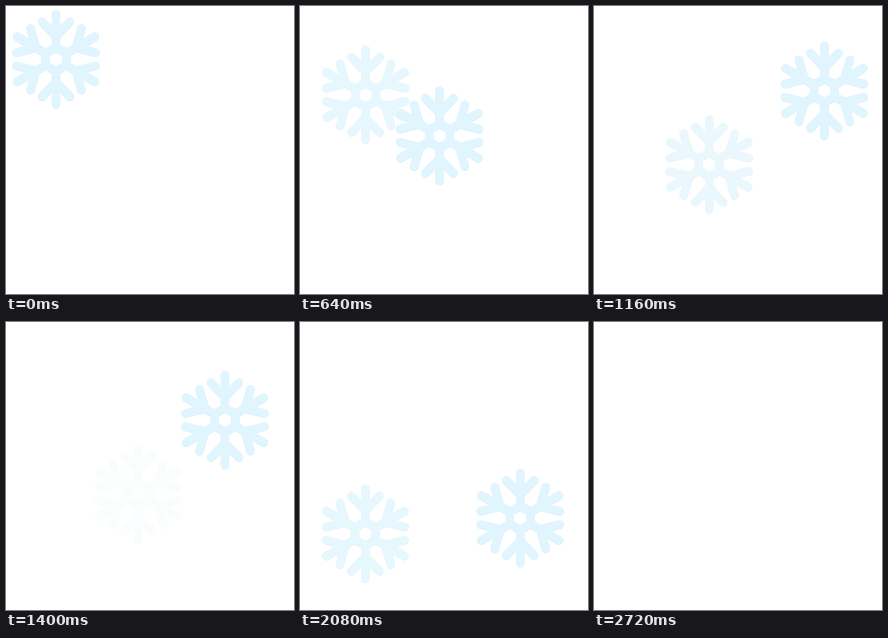
An HTML page for the animation above (2880 ms loop, 288 px wide and 288 px high).

```html
<!DOCTYPE html>
<html lang="en">
<head>
<meta charset="utf-8">
<title>Snowflakes</title>
<style>
  html, body { margin: 0; width: 100%; height: 100%; overflow: hidden; background: #fff; }
  svg { display: block; width: 100%; height: 100%; }
</style>
</head>
<body>
<svg id="stage" viewBox="0 0 288 288">
  <defs>
    <path id="arm" d="M0 -12V-45M-14 -37.5L0 -23L14 -37.5"/>
    <g id="shape" fill="none" stroke-width="8.4" stroke-linecap="round" stroke-linejoin="round">
      <path d="M0 -12L10.4 -6V6L0 12L-10.4 6V-6Z" stroke-linejoin="miter"/>
      <use href="#arm"/>
      <use href="#arm" transform="rotate(60)"/>
      <use href="#arm" transform="rotate(120)"/>
      <use href="#arm" transform="rotate(180)"/>
      <use href="#arm" transform="rotate(240)"/>
      <use href="#arm" transform="rotate(300)"/>
    </g>
    <g id="flake">
      <use href="#shape" y="0.5" stroke="#d3edf7"/>
      <use href="#shape" stroke="#e1f5fe"/>
    </g>
  </defs>
</svg>
<script>
  const LOOP = 2880, STEP = 40, FALL = 1 / 18, FADE = 440;

  // x: start, turning point and end of the sway
  const flakes = [
    { start: 0,    life: 980,  y: 53,    x: [50, 68, 57] },
    { start: 480,  life: 980,  y: 120.6, x: [150, 106.5, 133] },
    { start: 960,  life: 980,  y: 73.4,  x: [237, 218.5, 233] },
    { start: 1440, life: 980,  y: 175.8, x: [50, 67.5, 57.5] },
    { start: 1640, life: 1060, y: 171.3, x: [237, 219, 235] }
  ];

  const stage = document.getElementById('stage');
  for (const f of flakes) {
    f.el = document.createElementNS(stage.namespaceURI, 'use');
    f.el.setAttribute('href', '#flake');
    stage.append(f.el);
  }

  const ease = (a, b, p) => a + (b - a) * (1 - Math.cos(Math.PI * p)) / 2;

  function sway([from, turn, to], p) {
    return p < 0.5 ? ease(from, turn, p * 2) : ease(turn, to, p * 2 - 1);
  }

  function draw(time) {
    const t = Math.floor((time % LOOP) / STEP) * STEP;
    for (const f of flakes) {
      const age = t - f.start;
      const shown = age >= 0 && age < f.life;
      f.el.style.display = shown ? '' : 'none';
      if (!shown) continue;
      const x = sway(f.x, age / f.life);
      const y = f.y + age * FALL;
      f.el.setAttribute('transform', `translate(${x} ${y})`);
      f.el.setAttribute('opacity', Math.min(1, (f.life - age) / FADE));
    }
  }

  const begin = performance.now();
  function tick() {
    draw(performance.now() - begin);
    requestAnimationFrame(tick);
  }
  tick();
</script>
</body>
</html>
```
